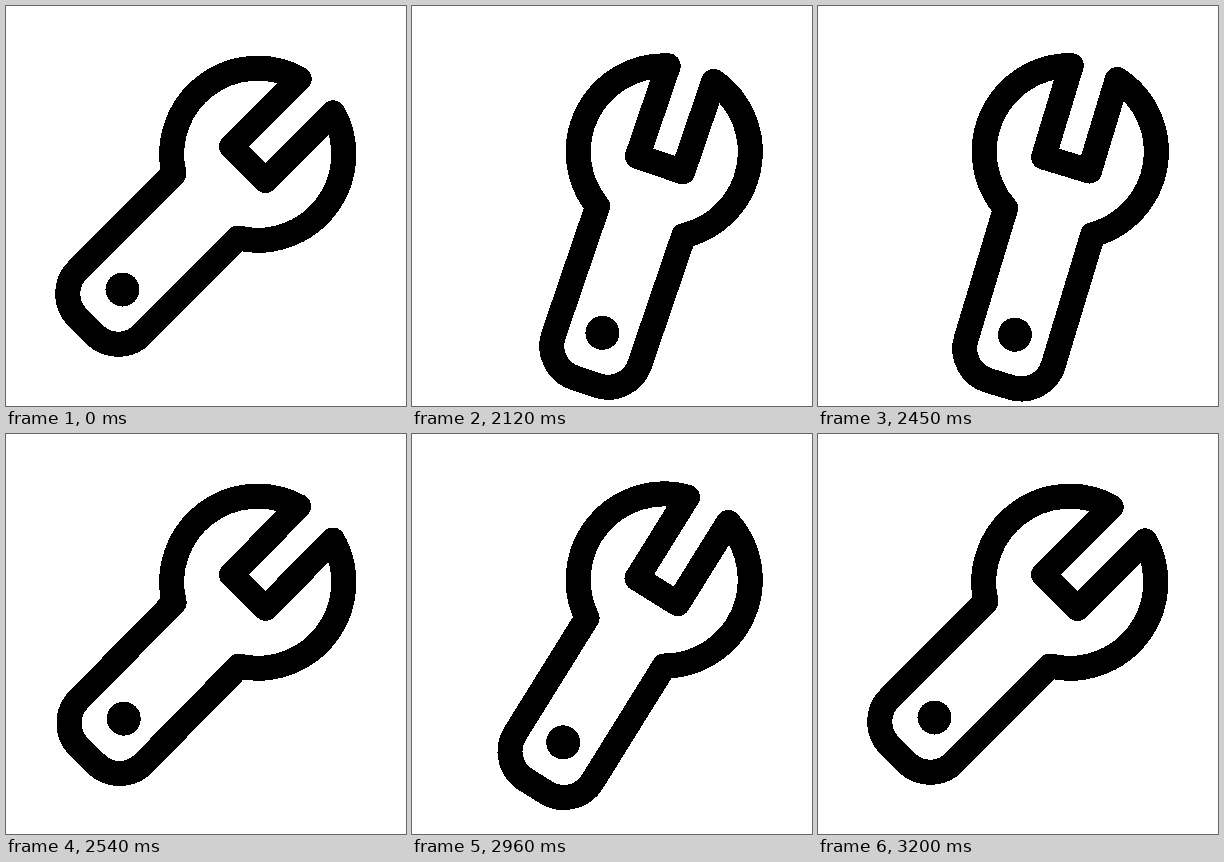
Write an HTML page that moves like this. It is 400 px wide and 400 px high and loops after 3230 ms.

```html
<!DOCTYPE html>
<html lang="en">
<head>
<meta charset="utf-8">
<title>Wrench</title>
<style>
  html, body { margin: 0; width: 100%; height: 100%; overflow: hidden; background: #fff; }
  svg { display: block; width: 100%; height: 100%; shape-rendering: crispEdges; }
</style>
</head>
<body>
<svg viewBox="0 0 400 400">
  <g id="wrench">
    <path fill="none" stroke="#000" stroke-width="25" stroke-linejoin="round"
      d="M24-82.6A86 86 0 0 1 45.5 73V209.3A33.5 33.5 0 0 1 12 242.8H-12A33.5 33.5 0 0 1-45.5 209.3V73A86 86 0 0 1-24-82.6V13H24Z"/>
    <circle cy="191.3" r="17"/>
  </g>
</svg>
<script>
  const LOOP = 3230, REST = 2030, STEP = 30;
  const TILT = 45, HEAD = { x: 251.75, y: 148.25 }, SHIFT = { x: 0.9, y: -4.2 };
  const wrench = document.getElementById('wrench');

  const progress = (n, from, to) => Math.min(1, Math.max(0, (n - from) / (to - from)));
  const sine = p => (1 - Math.cos(Math.PI * p)) / 2;
  const cubicOut = p => 1 - (1 - p) ** 3;
  const backOut = (p, s = 2.1) => 1 + (s + 1) * (p - 1) ** 3 + s * (p - 1) ** 2;

  // Two pulls to upright: 0 is tilted, 1 is upright.
  function pull(n) {
    if (n < 11) return sine(progress(n, -0.2, 5.6));
    if (n < 18) return 1 - sine(progress(n, 11.55, 17.4));
    return sine(progress(n, 18.75, 24.17));
  }

  function draw() {
    const t = performance.now() % LOOP;
    const n = Math.floor((t - REST) / STEP);
    // The final release swings past the tilt while the head glides home.
    const back = progress(n, 29.22, 39);
    const turn = pull(n) * (1 - backOut(back));
    const move = pull(n) * (1 - cubicOut(back));
    const x = HEAD.x + SHIFT.x * move, y = HEAD.y + SHIFT.y * move;
    wrench.setAttribute('transform', `translate(${x} ${y}) rotate(${TILT * (1 - turn)})`);
    requestAnimationFrame(draw);
  }
  draw();
</script>
</body>
</html>
```
